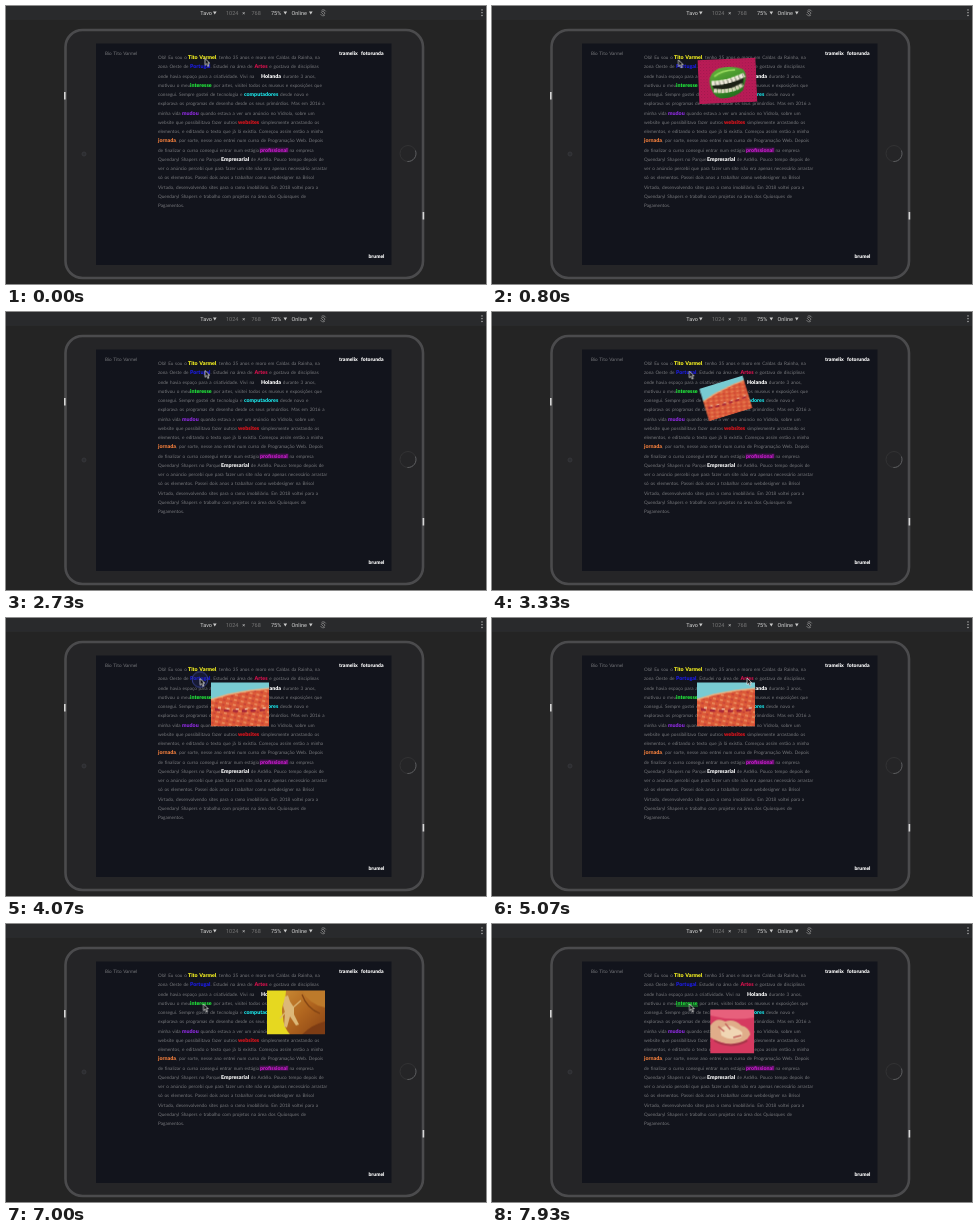
These frames come from a looping animation (480 px wide and 278 px high, 8000 ms). An HTML page:

```html
<!DOCTYPE html>
<html lang="pt">
<head>
<meta charset="utf-8">
<title>Bio</title>
<style>
html, body { margin: 0; width: 100%; height: 100%; overflow: hidden; background: #242424; }
svg { display: block; width: 100vw; height: 100vh; }
text { text-rendering: geometricPrecision; }
.bar text { font: 5.5px Roboto, sans-serif; fill: #d4d4d4; }
.bar .dim { fill: #777; }
.page text { font: 4.68px Lato, sans-serif; word-spacing: .6px; fill: #77787c; }
.page .b { font-weight: 900; font-size: 5.3px; }
.page .w { fill: #fff; }

.pic, .cursor, .hover, .ring { animation: 8s ease-in-out infinite; }
.teeth { animation-name: teeth; }
.beach { animation-name: beach; }
.figure { animation-name: figure; }
.hands { animation-name: hands; }
.cursor { animation-name: cursor; }
.ring { animation-name: ring; }
.hover { animation-name: hover; animation-timing-function: step-end; }

@keyframes teeth {
  0%, 1.8% { transform: rotate(-80deg) scale(0); }
  6.5% { transform: rotate(-28deg) scale(1.03); }
  10.9%, 22% { transform: none; opacity: 1; }
  26% { transform: rotate(42deg) scale(1.18); opacity: 1; }
  31.6%, 100% { transform: rotate(95deg) scale(0); opacity: .6; }
}
@keyframes beach {
  0%, 38.4% { transform: rotate(-40deg) scale(0); }
  43.5% { transform: rotate(-8deg) scale(1.08); }
  47.5%, 65.9% { transform: none; opacity: 1; }
  70%, 100% { transform: rotate(20deg) scale(0); opacity: .5; }
}
@keyframes figure {
  0%, 67.5% { transform: rotate(-20deg) scale(0); }
  71.5%, 72.5% { transform: scale(.96); }
  75.9%, 90% { transform: none; opacity: 1; }
  93.7%, 100% { transform: rotate(20deg) scale(0); opacity: .5; }
}
@keyframes hands {
  0%, 92.8% { transform: rotate(-75deg) scale(0); }
  96.5% { transform: rotate(-40deg) scale(1.28); }
  99%, 100% { transform: none; }
}
@keyframes cursor {
  0%, 1% { transform: translate(199px, 52.5px); }
  5% { transform: translate(193px, 51px); }
  11% { transform: translate(186px, 54px); }
  17.5%, 21.7% { transform: translate(163.5px, 59px); }
  24% { transform: translate(157px, 58px); }
  30% { transform: translate(196px, 58px); }
  34.1%, 38% { transform: translate(199px, 58.5px); }
  47%, 61.5% { transform: translate(194px, 60.5px); }
  63.4%, 76.5% { transform: translate(255px, 60px); }
  86% { transform: translate(199px, 80.5px); }
  87.5%, 100% { transform: translate(197.5px, 80px); }
}
@keyframes ring {
  0%, 50.7% { opacity: 0; }
  50.8%, 52% { opacity: 1; }
  56%, 100% { opacity: 0; }
}
@keyframes hover { 0% { opacity: 0; } 92% { opacity: 1; } }
</style>
</head>
<body>
<svg viewBox="0 0 480 278" preserveAspectRatio="none">
  <defs>
    <clipPath id="wide"><rect x="-28.7" y="-21.3" width="57.4" height="42.6"/></clipPath>
    <clipPath id="square"><rect x="-21.5" y="-21.5" width="43" height="43"/></clipPath>
    <pattern id="grain" width="3" height="3" patternUnits="userSpaceOnUse">
      <rect width="3" height="3" fill="#bf1c58"/>
      <path d="M0 0h1v1h-1zM1.5 1.5h1v1h-1z" fill="#97184a"/>
    </pattern>
    <pattern id="rows" width="7" height="5" patternUnits="userSpaceOnUse" patternTransform="rotate(12)">
      <rect width="7" height="5" fill="#dc5a38"/>
      <path d="M0 1h3v1.2h-3z" fill="#f0a06c"/>
      <path d="M3.5 3.3h2.4v1h-2.4z" fill="#b52c35"/>
    </pattern>
    <linearGradient id="skin" x2="1" y2="1">
      <stop stop-color="#c98a34"/><stop offset=".5" stop-color="#b0651f"/><stop offset="1" stop-color="#8a4415"/>
    </linearGradient>
    <linearGradient id="gum" x2=".4" y2="1">
      <stop stop-color="#69b83c"/><stop offset="1" stop-color="#25731f"/>
    </linearGradient>
  </defs>

  <rect width="480" height="278" fill="#242424"/>
  <g class="bar">
    <rect width="480" height="13" fill="#292a2c"/>
    <path d="M0 13.3H480" stroke="#303133" stroke-width=".6"/>
    <text x="194.3" y="8.6">Tavo</text>
    <text x="220" y="8.6" class="dim">1024</text>
    <text x="236.3" y="8.6">×</text>
    <text x="245.5" y="8.6" class="dim">768</text>
    <text x="265" y="8.6">75%</text>
    <text x="285.5" y="8.6">Online</text>
    <path d="M207 5.5h3.6l-1.8 3zM277.5 5.5h3.6l-1.8 3zM303 5.5h3.6l-1.8 3z" fill="#ccc"/>
    <g fill="none" stroke="#999" stroke-width=".7">
      <rect x="316.2" y="5.2" width="2" height="3.2" transform="rotate(-45 317.2 6.8)"/>
      <path d="M314.6 8.2a2.9 2.9 0 0 0 4.3 1M319.8 5.4a2.9 2.9 0 0 0-4.3-1"/>
    </g>
    <path d="M476 3.8v.1M476 6.6v.1M476 9.4v.1" stroke="#c8c8c8" stroke-width="1.3" stroke-linecap="round"/>
  </g>

  <rect x="59.5" y="24" width="357.5" height="248" rx="17" fill="#252527" stroke="#4b4b4d" stroke-width="2.6"/>
  <path d="M58.8 86v7.5M417.4 206v7.5" stroke="#d5d5d5" stroke-width="1.6"/>
  <circle cx="78" cy="148" r="2" fill="#2c2d30" stroke="#3b3c3f" stroke-width=".7"/>
  <circle cx="402" cy="147.5" r="8" fill="#252527" stroke="#363638" stroke-width=".8"/>
  <path d="M409.4 144.5a8 8 0 0 1-8 11" fill="none" stroke="#66676a" stroke-width=".8"/>

  <rect x="90" y="37.5" width="295.5" height="221.5" fill="#12141c"/>
  <g class="page">
    <text x="99" y="49.3">Bio Tito Varmel</text>
    <text x="333" y="49.3" class="b w" style="font-size:5px">tramelix</text>
    <text x="355" y="49.3" class="b w" style="font-size:5px">fotorunda</text>
    <text x="362.5" y="251.5" class="b w" style="font-size:5px">brumel</text>
    <rect x="253.5" y="141.6" width="29" height="5" fill="#7c0f86" opacity=".45"/>
    <text y="53">
      <tspan x="152">Olá! Eu sou o</tspan><tspan x="182" class="b" fill="#f7f321">Tito Varmel</tspan><tspan>, tenho 35 anos e moro em Caldas da Rainha, na</tspan>
      <tspan x="152" dy="9.25">zona Oeste de</tspan><tspan x="184" class="b" fill="#1c1ce6">Portugal</tspan><tspan>. Estudei na área de</tspan><tspan x="248.5" class="b" fill="#d9124e">Artes</tspan><tspan> e gostava de disciplinas</tspan>
      <tspan x="152" dy="9.25">onde havia espaço para a criatividade. Vivi na</tspan><tspan x="255" class="b w">Holanda</tspan><tspan> durante 3 anos,</tspan>
      <tspan x="152" dy="9.25">motivou o meu</tspan><tspan x="184" class="b" fill="#22ef3c">interesse</tspan><tspan> por artes, visitei todos os museus e exposições que</tspan>
      <tspan x="152" dy="9.25">consegui. Sempre gostei de tecnologia e</tspan><tspan x="238" class="b" fill="#1be4e8">computadores</tspan><tspan> desde novo e</tspan>
      <tspan x="152" dy="9.25">explorava os programas de desenho desde os seus primórdios. Mas em 2016 a</tspan>
      <tspan x="152" dy="9.25">minha vida</tspan><tspan x="176" class="b" fill="#8f2be0">mudou</tspan><tspan> quando estava a ver um anúncio no Vidrola, sobre um</tspan>
      <tspan x="152" dy="9.25">website que possibilitava fazer outros</tspan><tspan x="232" class="b" fill="#e5141c">websites</tspan><tspan> simplesmente arrastando os</tspan>
      <tspan x="152" dy="9.25">elementos, e editando o texto que já lá existia. Começou assim então a minha</tspan>
      <tspan x="152" dy="9.25" class="b" fill="#ee7d3c">jornada</tspan><tspan>, por sorte, nesse ano entrei num curso de Programação Web. Depois</tspan>
      <tspan x="152" dy="9.25">de finalizar o curso consegui entrar num estágio</tspan><tspan x="254" class="b" fill="#c41bc8">profissional</tspan><tspan> na empresa</tspan>
      <tspan x="152" dy="9.25">Quendaryl Shapers no Parque</tspan><tspan x="215" class="b w">Empresarial</tspan><tspan> de Ardélo. Pouco tempo depois de</tspan>
      <tspan x="152" dy="9.25">ver o anúncio percebi que para fazer um site não era apenas necessário arrastar</tspan>
      <tspan x="152" dy="9.25">só os elementos. Passei dois anos a trabalhar como webdesigner na Brisol</tspan>
      <tspan x="152" dy="9.25">Virtado, desenvolvendo sites para o ramo imobiliário. Em 2018 voltei para a</tspan>
      <tspan x="152" dy="9.25">Quendaryl Shapers e trabalho com projetos na área dos Quiosques de</tspan>
      <tspan x="152" dy="9.25">Pagamentos.</tspan>
    </text>
    <path class="hover" d="M184 82H206" stroke="#22ef3c" stroke-width=".7"/>
  </g>

  <g transform="translate(235.5 75)"><g class="pic teeth"><g clip-path="url(#wide)">
    <rect x="-29" y="-22" width="58" height="44" fill="url(#grain)"/>
    <path d="M-18 0Q-18 -9 -8 -13Q6 -16 16 -11Q20 -6 18 0L15 10Q6 18 -8 17Q-17 14 -18 0Z" fill="url(#gum)"/>
    <path d="M-16 1Q0 1 17 -7L15 5Q4 9 -14 8Z" fill="#1b2115"/>
    <path d="M-16 1.5Q0 2 17 -5.5" fill="none" stroke="#eeeada" stroke-width="4.6" stroke-dasharray="3.6 .5"/>
    <path d="M-14 9Q3 12 15 4" fill="none" stroke="#d9d8bc" stroke-width="4" stroke-dasharray="3.2 .5"/>
    <path d="M-13 -5Q-6 -11 8 -11" fill="none" stroke="#95d75c" stroke-width="1.8"/>
  </g></g></g>

  <g transform="translate(234 86.5)"><g class="pic beach"><g clip-path="url(#wide)">
    <rect x="-29" y="-22" width="58" height="44" fill="url(#rows)"/>
    <path d="M-29 -22H29V-16L10 -14L-12 -10L-29 -5Z" fill="#78cbd2"/>
    <path d="M-29 -5L-12 -10L10 -14L29 -16" fill="none" stroke="#e8b080" stroke-width="1.4"/>
    <path d="M-25 5Q0 8 29 5" fill="none" stroke="#a62536" stroke-width="2.4" stroke-dasharray="5 4"/>
    <path d="M-22 3.5Q0 6 29 3" fill="none" stroke="#f4d9b8" stroke-width="1.2" stroke-dasharray="3 6"/>
  </g></g></g>

  <g transform="translate(290 88.5)"><g class="pic figure"><g clip-path="url(#wide)">
    <rect x="-29" y="-22" width="58" height="44" fill="#e6d820"/>
    <path d="M-10 -22H29V22H-6Q-13 14 -13 4Q-16 -4 -11 -12Z" fill="url(#skin)"/>
    <path d="M6 -22Q13 -8 29 -5V-22Z" fill="#bd7a2b"/>
    <path d="M29 9Q16 12 6 22H29Z" fill="#7d3c14"/>
    <path d="M6 -18Q11 -4 24 1" fill="none" stroke="#824414" stroke-width="1.3"/>
    <path d="M-11 -16l3 -1 2 6 4 6 0 7 5 10 -3 1 -6 -9 -3 11 -3 -1 1 -14 -2 -7Z" fill="#dcb878"/>
    <path d="M-3 -5L5 -12M-9 -2L-16 6" stroke="#dcb878" stroke-width="1.2"/>
  </g></g></g>

  <g transform="translate(240.3 107.5)"><g class="pic hands"><g clip-path="url(#square)">
    <rect x="-22" y="-22" width="44" height="44" fill="#d63a60"/>
    <path d="M-22 -22H22V-14Q0 -10 -22 -16Z" fill="#e7607c"/>
    <path d="M-22 -6Q-16 -15 -7 -10Q2 -13 9 -6Q17 -4 18 3Q14 12 0 13Q-12 12 -22 6Z" fill="#e0ad8a"/>
    <path d="M-12 -3Q-4 -9 4 -3Q13 0 9 6Q-2 10 -11 4Z" fill="#f0d6b4"/>
    <path d="M-14 -5l6 5M-7 -8l5 6M1 6l8 -2" stroke="#c2625c" stroke-width="1.4"/>
    <path d="M-18 9Q-2 18 15 9" fill="none" stroke="#a73549" stroke-width="2"/>
  </g></g></g>

  <g class="cursor">
    <circle class="ring" cy="1" r="7.8" fill="#3039a0" fill-opacity=".18" stroke="#3c4699" stroke-width=".9"/>
    <path d="M0 0V6.6L1.6 5.2L2.8 7.9L4 7.4L2.8 4.7H4.8Z" fill="#111" stroke="#eee" stroke-width=".7"/>
  </g>
</svg>
</body>
</html>
```
